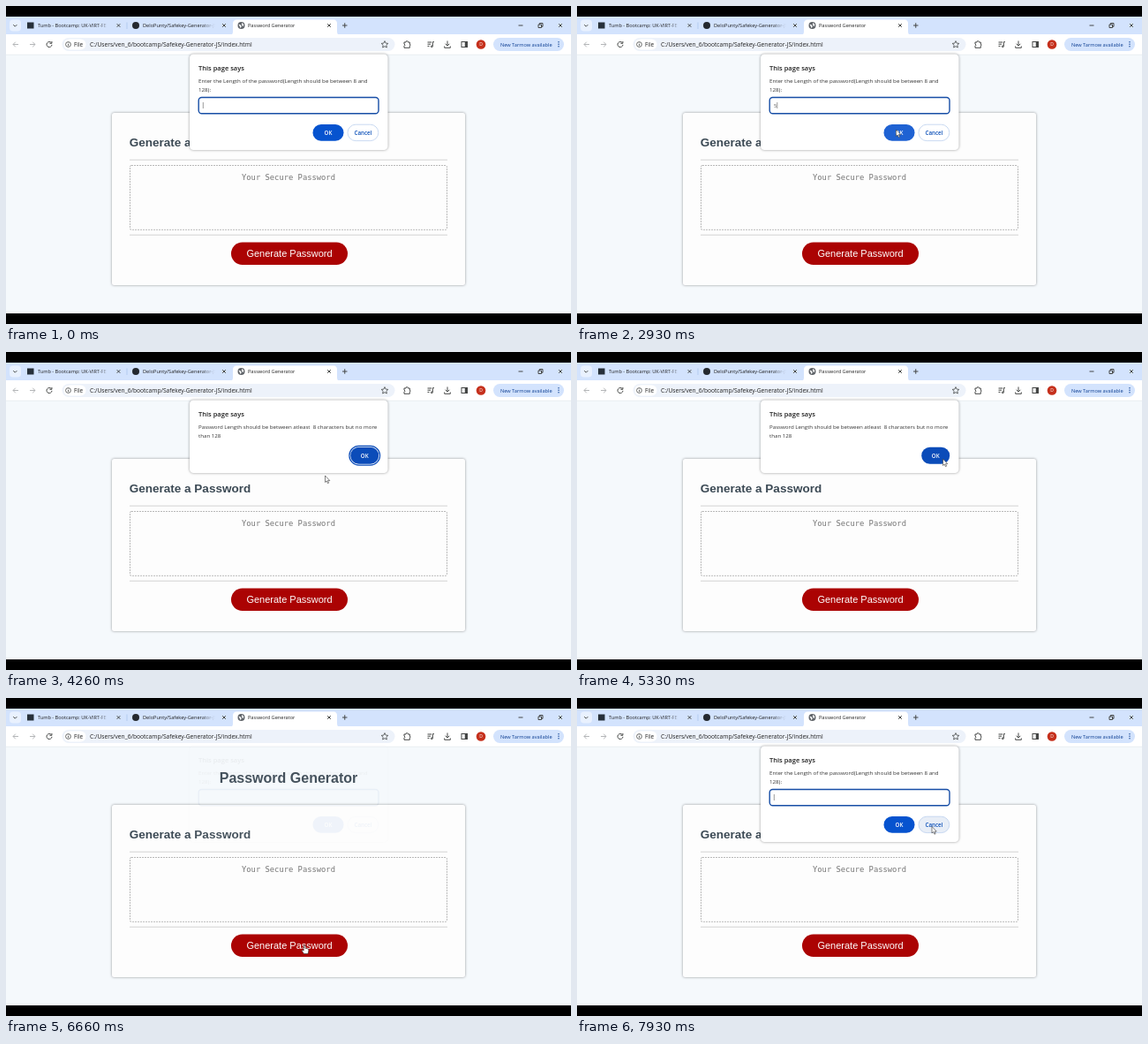
Animation of 640x360 px, one loop 8 s. Source, as an HTML page:

```html
<!DOCTYPE html>
<html lang="en">
<head>
<meta charset="utf-8">
<title>Password Generator</title>
<style>
  html, body { margin: 0; width: 100%; height: 100%; overflow: hidden; background: #000; }
  svg { display: block; width: 100vw; height: 100vh; }
  text { font-family: "Open Sans", "Noto Sans", sans-serif; fill: #1f1f1f; }
  .page text { font-family: "Liberation Sans", Arial, sans-serif; fill: #3b4954; text-anchor: middle; }
  .page .mono { font: 8.8px "DejaVu Sans Mono", monospace; fill: #757575; }
  .tabs text { font-size: 5.6px; }
  .msg { font-size: 6.18px; fill: #333; }
  .head { font-size: 7.5px; font-weight: 600; }
  .btn { font-size: 6.2px; font-weight: 600; text-anchor: middle; }
  .icon { fill: none; stroke: #454746; stroke-width: 1; }
  .card { filter: drop-shadow(0 .5px 1.6px #0006); }
</style>
</head>
<body>
<svg viewBox="0 0 640 360">
  <defs>
    <linearGradient id="fade">
      <stop offset="0" stop-color="#d3e3fd" stop-opacity="0"/>
      <stop offset="1" stop-color="#d3e3fd"/>
    </linearGradient>
    <path id="x" d="M-1.8-1.8L1.8 1.8M1.8-1.8L-1.8 1.8"/>
  </defs>
  <rect width="640" height="360"/>

  <g class="page">
    <rect y="55" width="640" height="293" fill="#f5f9fc"/>
    <text x="320" y="96" font-size="16" font-weight="700">Password Generator</text>
    <rect class="card" x="120" y="121" width="400" height="195" rx="2.5" fill="#fdfdfd"/>
    <text x="208.5" y="159" font-size="13.5" font-weight="700">Generate a Password</text>
    <path d="M140 174.2H500M140 259.2H500" stroke="#d3d3d3"/>
    <rect x="140.5" y="180.5" width="359" height="72.8" rx="1.5" fill="none" stroke="#b9b9b9" stroke-dasharray="2 1"/>
    <text class="mono" x="320" y="197">Your Secure Password</text>
    <rect x="255" y="267.5" width="132" height="25.5" rx="12.75" fill="#ab0303"/>
    <text x="321" y="284" font-size="11" style="fill:#fff">Generate Password</text>
  </g>

  <g class="tabs">
    <rect y="12" width="640" height="21" fill="#d3e3fd"/>
    <rect x="4" y="15.5" width="13" height="13" rx="4" fill="#e9f1fe"/>
    <path class="icon" d="M8.3 21.2L10.3 23.2L12.3 21.2"/>
    <rect x="24" y="18.5" width="7.5" height="7" fill="#27303a"/>
    <text x="36" y="24.3">Tumb - Bootcamp: UK-VIRT-FE</text>
    <rect x="102" y="16" width="16" height="13" fill="url(#fade)"/>
    <rect x="118" y="16" width="6" height="13" fill="#d3e3fd"/>
    <path d="M137 18.5V26" stroke="#a8c2ea" stroke-width=".7"/>
    <circle cx="147" cy="22" r="4" fill="#24292f"/>
    <text x="155" y="24.3">DeloPunty/Safekey-Generator-JS</text>
    <rect x="222" y="16" width="15" height="13" fill="url(#fade)"/>
    <rect x="237" y="16" width="7" height="13" fill="#d3e3fd"/>
    <path d="M253 33Q257 33 257 29V20Q257 15.5 261.500 15.500H371Q375 15.500 375 20V29Q375 33 379 33Z" fill="#fff"/>
    <circle cx="266.500" cy="22" r="4" fill="#5f6368"/>
    <path d="M263.500 20.500l2.500 1 .8 2-1.300 1.500zM267 19l2.300 1.500-.5 2.800-1.800-1.500z" fill="#fff"/>
    <text x="274" y="24.3">Password Generator</text>
    <g class="icon" stroke-width=".9">
      <use href="#x" x="127.500" y="22"/>
      <use href="#x" x="247" y="22"/>
      <use href="#x" x="366" y="22"/>
      <path d="M381 22H386.500M383.750 19.250V24.750"/>
      <path d="M580.500 22H585.500M603 21V24.500H606.500V21ZM604.300 21V19.500H608V23.300H606.500"/>
      <use href="#x" x="628" y="22"/>
    </g>
  </g>

  <g>
    <rect y="32" width="640" height="23" fill="#fff"/>
    <path d="M0 55.200H640" stroke="#dfe4ea" stroke-width=".6"/>
    <rect x="63.500" y="36" width="377" height="15" rx="7.500" fill="#edf2fa"/>
    <rect x="65.500" y="37.500" width="25" height="12" rx="6" fill="#fff"/>
    <g class="icon">
      <path d="M14 43.500H8M10.800 40.700L8 43.500L10.800 46.300M27 43.500H33M30.200 40.700L33 43.500L30.200 46.300" stroke="#b4b6b8"/>
      <path d="M51.300 41.600A3 3 0 1 0 52 43.900M51.900 40V42.300H49.500"/>
      <circle cx="70.500" cy="43.500" r="2.900" stroke-width=".8"/>
      <path d="M70.500 43V45.200M70.500 41.600V42.300" stroke-width=".8"/>
      <path d="M429 39.600l1.150 2.500 2.700.3-2 1.900.5 2.700-2.350-1.350-2.350 1.350.5-2.700-2-1.900 2.700-.3z" stroke-width=".8"/>
      <path d="M451 41H453V40.300Q454.200 38.800 455.300 40.300V41H457.300V43Q459 44 457.300 45.200V47.300H451V45.300Q453 44.200 451 43Z"/>
      <path d="M477.500 41H482M477.500 43.200H481M477.500 45.400H479.500M483.300 45.800V40.700H485"/>
      <circle cx="482.300" cy="45.800" r=".9"/>
      <path d="M500 39.500V45M497.700 42.800L500 45.100L502.300 42.800M496.700 45.500V47.300H503.300V45.500"/>
      <rect x="516" y="40.500" width="6.500" height="6"/>
      <path d="M521 40.500V46.500" stroke-width="2.500"/>
    </g>
    <text x="77" y="45.800" font-size="6.400">File</text>
    <text x="95" y="45.900" font-size="6.660">C:/Users/ven_6/bootcamp/Safekey-Generator-JS/index.html</text>
    <circle cx="538" cy="43.500" r="5.300" fill="#c5301c"/>
    <text x="538" y="45.400" font-size="5" text-anchor="middle" style="fill:#fff">D</text>
    <rect x="552" y="36" width="80" height="15" rx="7.500" fill="#d3e3fd"/>
    <text x="560" y="45.600" font-size="5.640" style="fill:#0b3d91">New Tarmow available</text>
    <path d="M626 40.800V46.500" stroke="#0b3d91" stroke-width="1.400" stroke-linecap="round" stroke-dasharray="0 2.500"/>
  </g>

  <g id="prompt">
    <rect class="card" x="208" y="54.500" width="224.500" height="108.500" rx="4.500" fill="#fff"/>
    <text class="head" x="218" y="72.600">This page says</text>
    <text class="msg" x="218" y="87">Enter the Length of the password(Length should be between 8 and</text>
    <text class="msg" x="218" y="97">128):</text>
    <rect x="218.200" y="103.500" width="203.800" height="18.300" rx="3.500" fill="#fff" stroke="#174ea6" stroke-width="1.400"/>
    <text id="typed" x="223" y="114.700" font-size="5.600" style="fill:#555">5</text>
    <path id="caret" d="M0 109V116" stroke="#555" stroke-width=".6"/>
    <rect id="ok" x="347.500" y="134" width="35" height="18.800" rx="9.400"/>
    <text class="btn" x="365" y="145.700" style="fill:#fff">OK</text>
    <rect id="cancel" x="387" y="134.200" width="34.800" height="18.400" rx="9.200" stroke="#bcd0ee" stroke-width=".8"/>
    <text class="btn" x="404.400" y="145.700" style="fill:#0b4fb8">Cancel</text>
  </g>

  <g id="alert">
    <rect class="card" x="208" y="54.500" width="224.500" height="82.500" rx="4.500" fill="#fff"/>
    <text class="head" x="218" y="72.600">This page says</text>
    <text class="msg" x="218" y="87">Password Length should be between atleast&nbsp; 8 characters but no more</text>
    <text class="msg" x="218" y="97">than 128</text>
    <rect id="ring" x="388.900" y="106.300" width="34.700" height="21.800" rx="10.900" fill="none" stroke="#0b4cb9" stroke-width="1.200"/>
    <rect x="390.200" y="107.700" width="32" height="19" rx="9.500" fill="#0b4cb9"/>
    <text class="btn" x="406.200" y="119.500" style="fill:#fff">OK</text>
  </g>

  <g id="cursor" fill="#fff" stroke="#333" stroke-width=".6" stroke-linejoin="round">
    <path id="arrow" d="M0 0V7.500L1.700 6L2.900 8.700L4.100 8.200L3 5.600H5.300Z"/>
    <path id="hand" d="M-.8 .5Q0-.7 .8 .5V3.700L4 4.500Q5 4.900 4.800 6.500L4 10H-.5L-2.800 6.700Q-2.700 5.400-.8 6.500Z"/>
  </g>
</svg>
<script>
const LOOP = 8000, BLINK = 535;
const $ = id => document.getElementById(id);
const clamp = v => Math.min(1, Math.max(0, v));
const ease = v => v * v * (3 - 2 * v);
const show = (id, on) => $(id).setAttribute("opacity", +on);

// start, end, then the point reached
const moves = [
  [2130, 2800, 361.5, 140],
  [4260, 5060, 414.5, 121],
  [5450, 5800, 354, 258],
  [6000, 6260, 338, 279.5],
  [6860, 7900, 402, 145.5]
];

function pointer(t) {
  let x = 347, y = 262;
  for (const [from, to, px, py] of moves) {
    const k = ease(clamp((t - from) / (to - from)));
    x += (px - x) * k;
    y += (py - y) * k;
  }
  return [x, y];
}

// opacity of a dialog that opens and closes with a short fade
const dialog = (t, open, close) => clamp((t - open) / 160) * clamp((close - t) / 130);

function draw(now) {
  const t = now % LOOP;
  const [x, y] = pointer(t);
  const over = (l, top, r, b) => x > l && x < r && y > top && y < b;

  show("prompt", Math.max(dialog(t, -500, 3150), dialog(t, 6653, 9000)));
  show("alert", dialog(t, 3200, 5510));
  show("ring", t < 5130);

  const typed = t >= 1400 && t < 5000;
  const blinkStart = t < 1400 ? -475 : t < 5000 ? 1393 : 6790;
  show("typed", typed);
  show("caret", Math.floor((t - blinkStart) / BLINK) % 2 === 0);
  $("caret").setAttribute("transform", `translate(${typed ? 226.8 : 223.3})`);

  $("ok").setAttribute("fill", t > 2130 && over(347, 134, 383, 153) ? "#1f62d3" : "#0653cf");
  $("cancel").setAttribute("fill", t > 6800 && over(387, 134, 422, 153) ? "#e8eef7" : "#fff");

  const hand = t > 5510 && t < 6800 && over(255, 267, 387, 293);
  show("cursor", t >= 2130);
  show("hand", hand);
  show("arrow", !hand);
  $("cursor").setAttribute("transform", `translate(${x} ${y})`);
  requestAnimationFrame(draw);
}
requestAnimationFrame(draw);
</script>
</body>
</html>
```
